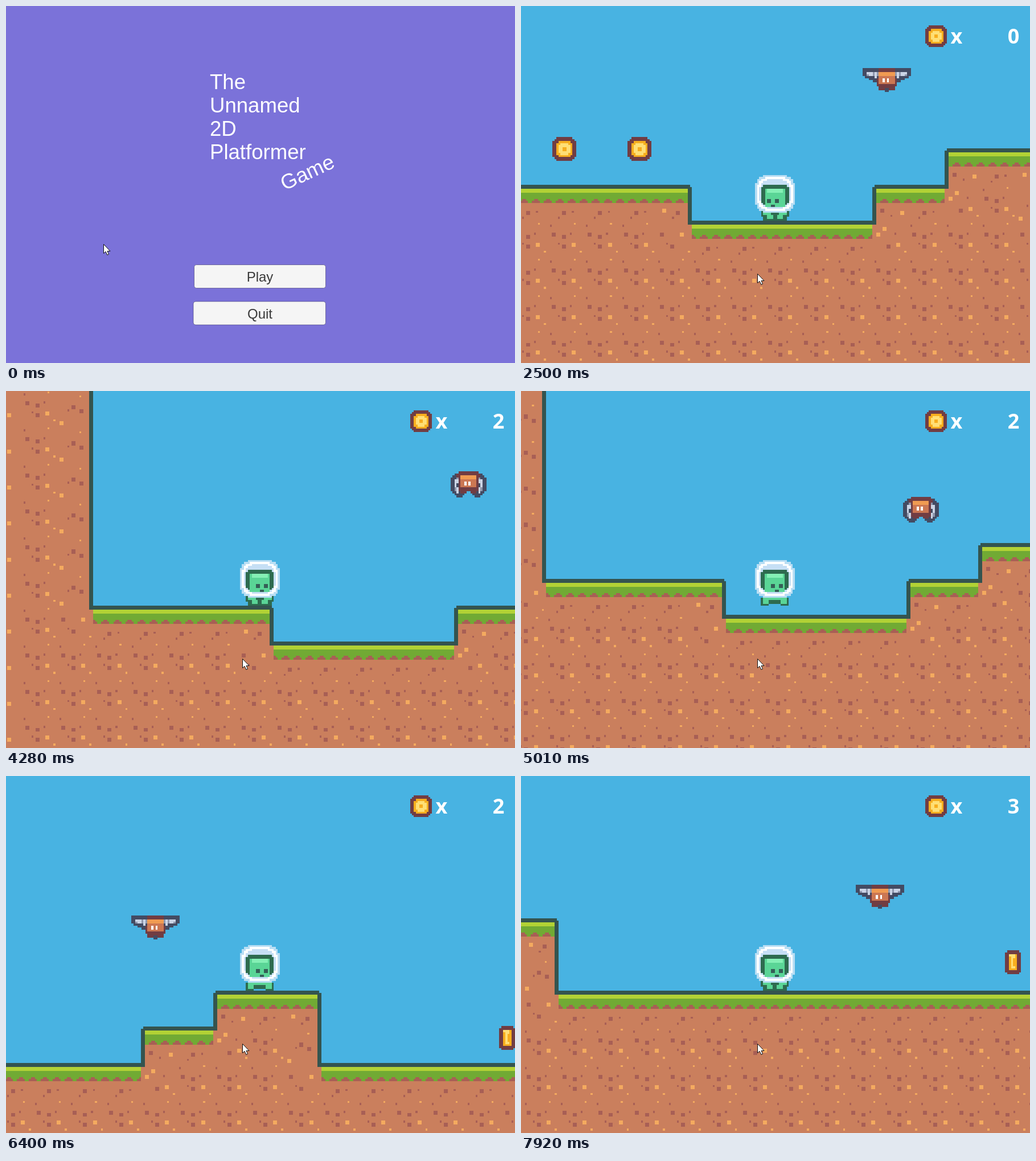
An HTML page with a canvas that plays this animation: 894x627 px, repeating every 7990 ms.

```html
<!DOCTYPE html>
<html lang="en">
<head>
<meta charset="utf-8">
<title>Platformer</title>
<style>
html, body { margin: 0; width: 100%; height: 100%; overflow: hidden; background: #48b3e2; }
canvas { display: block; }
</style>
</head>
<body>
<canvas id="stage" width="894" height="627"></canvas>
<script>
const W = 894, H = 627, LOOP = 7990;
const ctx = document.getElementById('stage').getContext('2d');
const PX = 3.518, TILE = 18 * PX;
const GROUND = 377, ORIGIN = 262;   // screen place of the pit's top left corner at the start

const C = {
  sky: '#48b3e2', line: '#34544f', lime: '#b2d235', grass: '#71aa34',
  dirt: '#ca7f5d', dark: '#a85f55', gold: '#f4aa5f',
  brown: '#713d43', coin: '#f7ae1e', shine: '#ffdf75',
  glass: '#b9def4', pane: '#c6dff5', white: '#ffffff',
  mint: '#5ad596', mintTop: '#85f0b5', deep: '#2e6b4f', eye: '#355f57',
  wing: '#434b63', feather: '#cbd4e5', shade: '#8f97ad', fur: '#cb7753', furTop: '#f09b52'
};

// ---- sprites -------------------------------------------------------------
function sprite(w, h, paint) {
  const cv = document.createElement('canvas');
  cv.width = w; cv.height = h;
  const g = cv.getContext('2d');
  const box = (color, x, y, bw, bh) => { g.fillStyle = color; g.fillRect(x, y, bw, bh); };
  const pair = (color, x, y, bw, bh) => { box(color, x, y, bw, bh); box(color, w - x - bw, y, bw, bh); };
  paint(box, pair);
  return cv;
}

function alien(jump) {
  return sprite(24, 24, (box, pair) => {
    if (jump) {
      box(C.deep, 8, 20, 8, 3);
      pair(C.deep, 5, 20, 4, 4);
      pair(C.mint, 6, 20, 3, 3);
      box(C.mint, 9, 20, 6, 1);
    } else {
      box(C.deep, 5, 19, 14, 3);
      box(C.deep, 6, 22, 12, 2);
      pair(C.mint, 6, 20, 4, 1);
      pair(C.mint, 8, 21, 3, 2);
    }
    const dome = (color, x, y, w, h) => {
      box(color, x + 4, y, w - 8, h);
      box(color, x + 2, y + 1, w - 4, h - 2);
      box(color, x + 1, y + 2, w - 2, h - 4);
      box(color, x, y + 4, w, h - 8);
    };
    dome(C.glass, 2, 1, 20, 19);
    dome(C.white, 3, 2, 18, 17);
    dome(C.pane, 4, 3, 16, 15);
    box(C.deep, 6, 6, 12, 2);
    box(C.deep, 5, 7, 14, 8);
    box(C.deep, 6, 15, 12, 1);
    box(C.mint, 7, 8, 10, 9);
    box(C.mintTop, 8, 8, 8, 2);
    box(C.eye, 8, 13, 2, 2);
    box(C.eye, 12, 13, 2, 2);
    box(C.eye, 10, 16, 2, 1);
  });
}

function flyer(open) {
  return sprite(24, 13, (box, pair) => {
    if (open) {
      pair(C.wing, 0, 0, 8, 4);
      pair(C.wing, 1, 4, 7, 1);
      pair(C.wing, 3, 5, 5, 1);
      pair(C.wing, 5, 6, 3, 1);
      pair(C.shade, 2, 2, 6, 2);
      pair(C.feather, 2, 2, 2, 1);
      pair(C.feather, 3, 2, 2, 2);
      pair(C.feather, 6, 2, 1, 3);
      box(C.brown, 8, 0, 8, 11);
      box(C.brown, 7, 5, 10, 4);
      box(C.brown, 9, 10, 6, 1);
      pair(C.wing, 11, 10, 1, 2);
    } else {
      pair(C.wing, 5, 1, 3, 1);
      pair(C.wing, 4, 2, 4, 9);
      pair(C.wing, 3, 3, 5, 7);
      pair(C.wing, 5, 11, 5, 1);
      pair(C.wing, 6, 12, 3, 1);
      pair(C.shade, 6, 3, 2, 3);
      pair(C.shade, 5, 8, 2, 2);
      pair(C.feather, 5, 4, 2, 2);
      pair(C.feather, 5, 6, 1, 2);
      pair(C.feather, 6, 8, 1, 3);
      box(C.brown, 7, 0, 10, 10);
      box(C.brown, 6, 1, 12, 2);
      pair(C.brown, 8, 9, 3, 2);
    }
    box(C.fur, 8, 2, 8, 6);
    box(C.furTop, 8, 2, 8, 2);
    box(C.white, 10, 5, 1, 2);
    box(C.white, 12, 5, 1, 2);
  });
}

const coinFront = sprite(12, 12, box => {
  box(C.brown, 2, 0, 8, 12);
  box(C.brown, 1, 1, 10, 10);
  box(C.brown, 0, 2, 12, 8);
  box(C.coin, 3, 2, 6, 8);
  box(C.coin, 2, 3, 8, 6);
  box(C.shine, 4, 3, 4, 6);
  box(C.shine, 3, 4, 6, 4);
  box(C.coin, 5, 5, 2, 2);
});
const coinSide = sprite(8, 12, box => {
  box(C.brown, 0, 1, 8, 10);
  box(C.brown, 1, 0, 6, 12);
  box(C.coin, 2, 2, 4, 8);
  box(C.shine, 3, 3, 2, 6);
  box(C.shine, 2, 2, 3, 1);
  box(C.coin, 4, 4, 1, 4);
});
const stand = alien(false), leap = alien(true);
const wingsOpen = flyer(true), wingsShut = flyer(false);

// ---- terrain -------------------------------------------------------------
// specks: x, y, size
const SPECKS = {
  mid:    { dark: [[2, 6, 2], [7, 7, 2], [11, 6, 1], [7, 12, 2], [5, 11, 1], [1, 2, 1]], gold: [[12, 11, 2], [16, 15, 1], [13, 1, 1]] },
  top:    { dark: [[7, 13, 2], [12, 13, 1], [5, 16, 1]], gold: [] },
  topL:   { dark: [[4, 12, 2], [9, 15, 1]], gold: [[14, 13, 2]] },
  topR:   { dark: [[10, 13, 2], [8, 16, 1]], gold: [[3, 12, 2]] },
  edgeL:  { dark: [[9, 5, 1], [4, 12, 1]], gold: [[5, 8, 2], [11, 12, 2], [8, 9, 1]] },
  edgeR:  { dark: [[7, 8, 2], [11, 10, 2], [5, 10, 1]], gold: [[1, 16, 2], [11, 3, 1]] },
  innerL: { dark: [[7, 12, 2], [11, 6, 1]], gold: [[2, 6, 2], [5, 3, 2], [12, 11, 2], [16, 15, 1]] },
  innerR: { dark: [[2, 6, 2], [7, 12, 2], [5, 11, 1]], gold: [[12, 6, 2], [16, 15, 1]] }
};

const tiles = {};
for (const kind in SPECKS) {
  tiles[kind] = sprite(18, 18, box => {
    const left = kind.endsWith('L'), right = kind.endsWith('R');
    const top = kind.startsWith('top'), inner = kind.startsWith('inner');
    const x0 = top && left ? 1 : 0, x1 = top && right ? 17 : 18;
    box(C.dirt, x0, 0, x1 - x0, 18);
    if (top) {
      box(C.dirt, 0, 1, 18, 17);
      box(C.grass, 0, 4, 18, 5);
      for (let x = 0; x <= 18; x += 6) {
        box(C.dark, x - 1, 7, 2, 1);
        box(C.dark, x - 2, 8, 4, 1);
      }
      box(C.lime, 0, 2, 18, 2);
      box(C.line, x0, 0, x1 - x0, 2);
    }
    for (const tone of ['dark', 'gold'])
      for (const [x, y, s] of SPECKS[kind][tone]) box(C[tone], x, y, s, s);
    if (left || right) box(C.line, left ? 0 : 16, top ? 1 : 0, 2, inner ? 2 : 18);
  });
}

// ground level of a column, in tiles above the pit
function level(c) {
  if (c < -8) return -99;
  if (c < -5) return 99;
  if (c < 0) return 1;
  if (c < 5) return 0;
  if (c < 7) return 1;
  return c < 10 ? 2 : 0;
}

function tileKind(c, r) {
  const here = level(c), l = level(c - 1), n = level(c + 1);
  if (r > here) return null;
  const side = l < r ? 'L' : n < r ? 'R' : '';
  if (r === here) return 'top' + side;
  if (side) return 'edge' + side;
  if (l === r) return 'innerL';
  return n === r ? 'innerR' : 'mid';
}

// ---- motion --------------------------------------------------------------
const linear = p => p;
const wave = p => (1 - Math.cos(Math.PI * p)) / 2;
const clamp = p => Math.min(1, Math.max(0, p));

function track(keys, t, ease) {
  if (t <= keys[0][0]) return keys[0][1];
  for (let i = 1; i < keys.length; i++) {
    const [a, u] = keys[i - 1], [b, v] = keys[i];
    if (t < b) return u + (v - u) * ease((t - a) / (b - a));
  }
  return keys[keys.length - 1][1];
}

const START = 1180, TURN = 3650, PRESS = 920;
const RUN = [[2380, 446], [TURN, 40], [4275, 238], [4663, 238], [5800, 598], [7000, 977], [LOOP, 1298]];
const HOVER = [[1010, 192], [2050, 94], [3080, 182], [4160, 94], [5040, 190], [5920, 98], [6950, 190], [7900, 94]];

// time off the ground, time of landing, level before, level after, jump speed
const AIR = [
  [2730, 3182, 0, 1, .7], [3198, 3765, 1, 1, .7], [4815, 5041, 1, 0, 0],
  [5216, 5668, 0, 1, .7], [5678, 6130, 1, 2, .7], [6823, 7143, 2, 0, 0]
];
const FALL = .001235;

// x, rest height, phase, time taken
const COINS = [[38, 263, -.3, 3700], [170, 264, 0, 3080], [1222, 326, -26.25, 7610], [1693, 327, -29.486, Infinity]];

function hero(t) {
  let y = GROUND, flying = false;
  for (const [t0, t1, from, to, v] of AIR) {
    if (t < t0) break;
    const d = t - t0;
    flying = t < t1;
    y = flying ? GROUND - from * TILE - v * d + FALL * d * d : GROUND - to * TILE;
  }
  const x = track(RUN, t, linear);
  const running = t > 2380 && !(t > 4275 && t < 4663);
  const step = running && Math.floor(t / 120) % 2 === 1;
  return { x, y, sprite: flying || step ? leap : stand };
}

// ---- drawing -------------------------------------------------------------
function put(img, x, y, s = PX) {
  const l = Math.round(x), u = Math.round(y);
  ctx.drawImage(img, l, u, Math.round(x + img.width * s) - l, Math.round(y + img.height * s) - u);
}

function text(str, x, y, font, color, align = 'left') {
  ctx.font = font;
  ctx.fillStyle = color;
  ctx.textAlign = align;
  ctx.fillText(str, x, y);
}

function cursor(x, y) {
  const pts = [[0, 0], [0, 16], [3.6, 12.8], [6.3, 18.8], [9, 17.6], [6.5, 12], [11.5, 12]];
  ctx.beginPath();
  for (const [px, py] of pts) ctx.lineTo(x + .5 + px, y + .5 + py);
  ctx.closePath();
  ctx.fillStyle = '#fff';
  ctx.fill();
  ctx.strokeStyle = '#111';
  ctx.lineWidth = 1;
  ctx.stroke();
}

function button(label, x, y, w, fill) {
  ctx.beginPath();
  ctx.roundRect(x, y, w, 41, 4);
  ctx.fillStyle = fill;
  ctx.fill();
  ctx.strokeStyle = 'rgba(50,45,100,.55)';
  ctx.lineWidth = 1;
  ctx.stroke();
  text(label, 446, y + 29.5, '24px "Liberation Sans", Arial, sans-serif', '#3a3a3a', 'center');
}

function menu(t) {
  const font = '36.6px "Liberation Sans", Arial, sans-serif';
  ctx.fillStyle = '#7b72d9';
  ctx.fillRect(0, 0, W, H);
  ['The', 'Unnamed', '2D', 'Platformer'].forEach((s, i) => text(s, 358, 145.5 + i * 41.2, font, '#fff'));
  ctx.save();
  ctx.translate(534.5, 303.5);
  ctx.rotate(-25 * Math.PI / 180);
  text('Game', 0, 0, font, '#fff', 'center');
  ctx.restore();
  const tone = Math.round(245 - 45 * clamp((t - PRESS) / 70));
  button('Play', 330.5, 454.5, 231, `rgb(${tone},${tone},${tone})`);
  button('Quit', 329, 519, 232.5, '#f5f5f5');
  const p = wave(clamp((t - 370) / 530));
  cursor(171 + 244 * p, 418 + 52 * p);
}

function terrain(dx, dy) {
  const c0 = Math.floor((-dx - ORIGIN) / TILE), c1 = Math.floor((W - dx - ORIGIN) / TILE);
  const r0 = Math.floor((GROUND + dy - H) / TILE), r1 = Math.ceil((GROUND + dy) / TILE);
  for (let c = c0; c <= c1; c++)
    for (let r = r0; r <= r1; r++) {
      const kind = tileKind(c, r);
      if (kind) put(tiles[kind], ORIGIN + c * TILE + dx, GROUND - r * TILE + dy);
    }
}

function game(t) {
  const me = hero(t);
  const dx = 446 - me.x, dy = GROUND - me.y;
  ctx.fillStyle = C.sky;
  ctx.fillRect(0, 0, W, H);
  terrain(dx, dy);

  const coin = Math.floor(t / 430) % 2 ? coinFront : coinSide;
  let score = 0;
  for (const [x, y, phase, taken] of COINS) {
    if (t >= taken) { score++; continue; }
    const bob = 13 * Math.sin((t - 1510) * .0046 + phase);
    put(coin, x + dx - coin.width * PX / 2, y + bob + dy - 6 * PX);
  }

  const bird = Math.floor((t + 3) / 190) % 2 ? wingsOpen : wingsShut;
  const second = 170 + 47 * Math.cos((t - 7920) * .0034 + .47);
  for (const [x, y] of [[604, track(HOVER, t, wave)], [1460, second]])
    put(bird, x + dx - 12 * PX, y + dy - 20.5);

  ctx.save();
  if (t >= TURN) {
    ctx.translate(892, 0);
    ctx.scale(-1, 1);
  }
  put(me.sprite, 446 - 12 * PX, GROUND - 24 * PX);
  ctx.restore();

  const font = 'bold 36px "Open Sans", "Noto Sans", sans-serif';
  put(coinFront, 709.5, 34, 3.17);
  text('x', 765, 66, font, '#fff', 'center');
  text(String(score), 865, 66, font, '#fff', 'center');
  cursor(415, 470);
}

let begin;
function frame(now) {
  begin ??= now;
  const t = (now - begin) % LOOP;
  ctx.imageSmoothingEnabled = false;
  if (t < START) menu(t); else game(t);
  requestAnimationFrame(frame);
}
requestAnimationFrame(frame);
</script>
</body>
</html>
```
